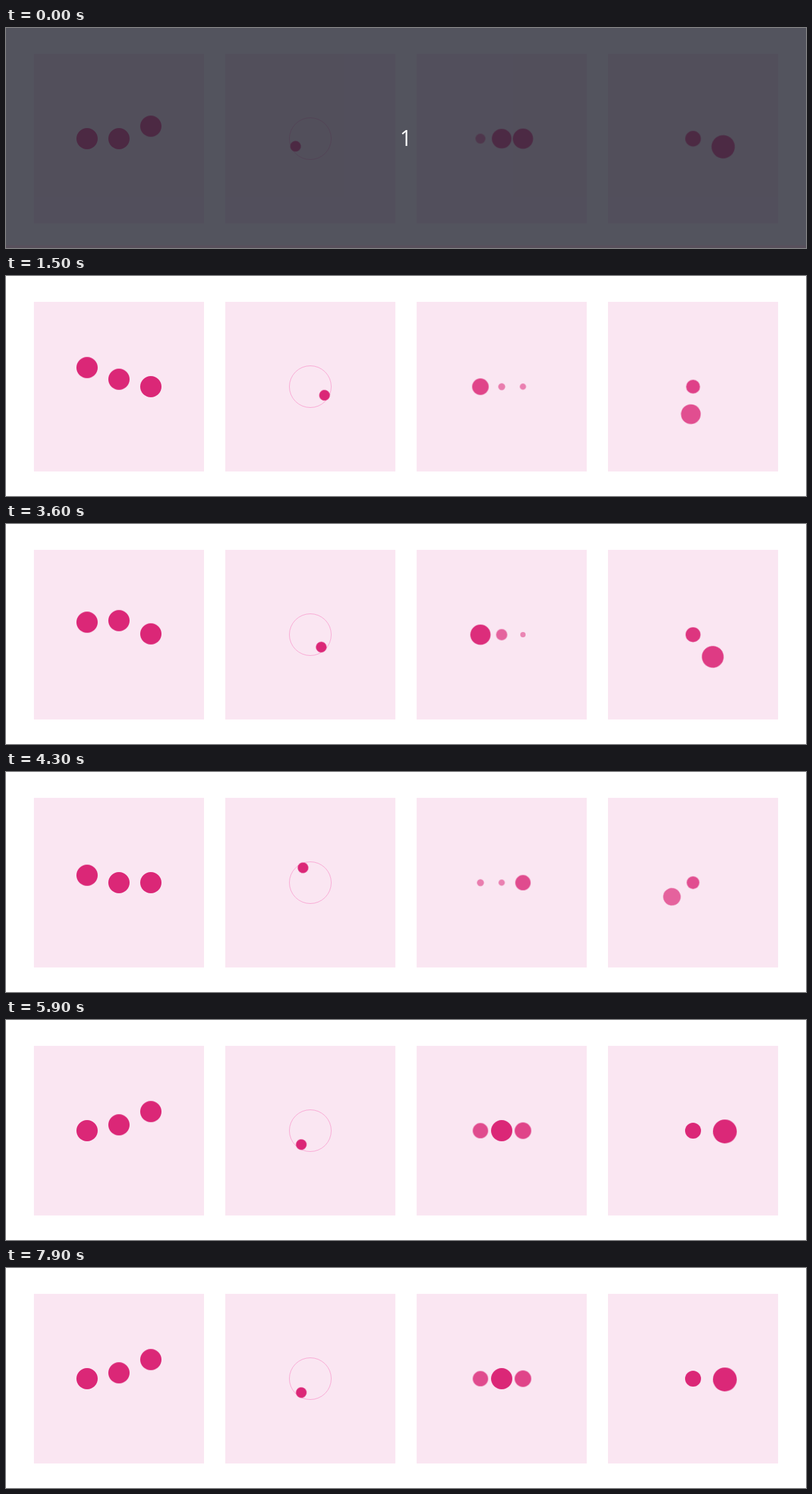
An HTML page for the animation above (8 s loop, 1204 by 332 pixels).

```html
<!DOCTYPE html>
<html lang="en">
<head>
<meta charset="utf-8">
<title>Four loaders</title>
<style>
  :root { --t: 0; --pink: #db2777; }
  html, body { margin: 0; width: 100%; height: 100%; overflow: hidden; background: #fff; }
  .stage { position: relative; width: 1204px; height: 332px; overflow: hidden; }

  .panel {
    position: absolute; top: 39px; left: calc(42px + 288px * var(--n));
    width: 256px; height: 256px; background: #fae6f2;
  }
  .dot {
    position: absolute; top: 128px; left: 128px;
    width: var(--d); height: var(--d);
    margin: calc(var(--d) / -2) 0 0 calc(var(--d) / -2);
    border-radius: 50%; background: var(--pink);
  }

  /* Every animation is paused and placed by the shared clock --t. */
  .dot, .cover {
    animation-play-state: paused !important;
    animation-delay: calc((var(--lag) - var(--t)) * 1ms) !important;
  }

  .bounce {
    --d: 32px; --lag: calc(200 * var(--i) - 1012);
    left: calc(80px + 48px * var(--i));
    animation: bounce 1s linear infinite;
  }
  @keyframes bounce {
    0%, 20%, 80%, 100% { transform: translateY(0); }
    50% { transform: translateY(-30px); }
  }

  .ring {
    position: absolute; top: 96px; left: 96px; width: 64px; height: 64px;
    box-sizing: border-box; border: 1px solid #f9a8d4; border-radius: 50%;
  }
  .runner { --d: 16px; --lag: -912; animation: run 2s ease-in-out infinite; }
  @keyframes run {
    from { transform: rotate(0deg) translateX(25px); }
    to { transform: rotate(360deg) translateX(25px); }
  }

  .pulse {
    --d: 32px; --lag: calc(200 * var(--i) - 812);
    left: calc(96px + 32px * var(--i));
    animation: pulse .5s ease-in-out infinite alternate;
  }
  @keyframes pulse {
    from { transform: scale(.25); opacity: .5; }
    to { transform: scale(1); opacity: 1; }
  }

  .sun, .moon { --lag: -145; animation: shrink 1s ease-in-out infinite alternate; }
  .sun { --d: 24px; }
  .moon { --d: 36px; animation-name: orbit; }
  @keyframes shrink {
    from { transform: scale(1); opacity: 1; }
    to { transform: scale(.5); opacity: .5; }
  }
  @keyframes orbit {
    from { transform: rotate(0deg) translateX(48px) scale(1); opacity: 1; }
    to { transform: rotate(360deg) translateX(24px) scale(.3333); opacity: .25; }
  }

  .cover {
    --lag: 0;
    position: absolute; inset: 0; background: rgba(40, 42, 54, .8);
    color: #fff; font: 32px/332px "Open Sans", "Noto Sans", sans-serif; text-align: center;
    animation: cover 8s step-end infinite;
  }
  .cover::after {
    content: ""; position: absolute; left: 0; right: 0; bottom: 0;
    height: 4px; background: #58505c;
  }
  @keyframes cover {
    0% { visibility: visible; }
    1.25%, 100% { visibility: hidden; }
  }
</style>
</head>
<body>
<div class="stage">
  <div class="panel" style="--n:0">
    <div class="dot bounce" style="--i:0"></div>
    <div class="dot bounce" style="--i:1"></div>
    <div class="dot bounce" style="--i:2"></div>
  </div>
  <div class="panel" style="--n:1">
    <div class="ring"></div>
    <div class="dot runner"></div>
  </div>
  <div class="panel" style="--n:2">
    <div class="dot pulse" style="--i:0"></div>
    <div class="dot pulse" style="--i:1"></div>
    <div class="dot pulse" style="--i:2"></div>
  </div>
  <div class="panel" style="--n:3">
    <div class="dot sun"></div>
    <div class="dot moon"></div>
  </div>
  <div class="cover">1</div>
</div>
<script>
  const LOOP = 8000, STEP = 100, LEAD = 20;
  const root = document.documentElement.style;
  const start = performance.now();

  // The picture moves in ten steps per second.
  function tick() {
    const t = (performance.now() - start + LEAD) % LOOP;
    root.setProperty('--t', Math.floor(t / STEP) * STEP);
    requestAnimationFrame(tick);
  }
  tick();
</script>
</body>
</html>
```
